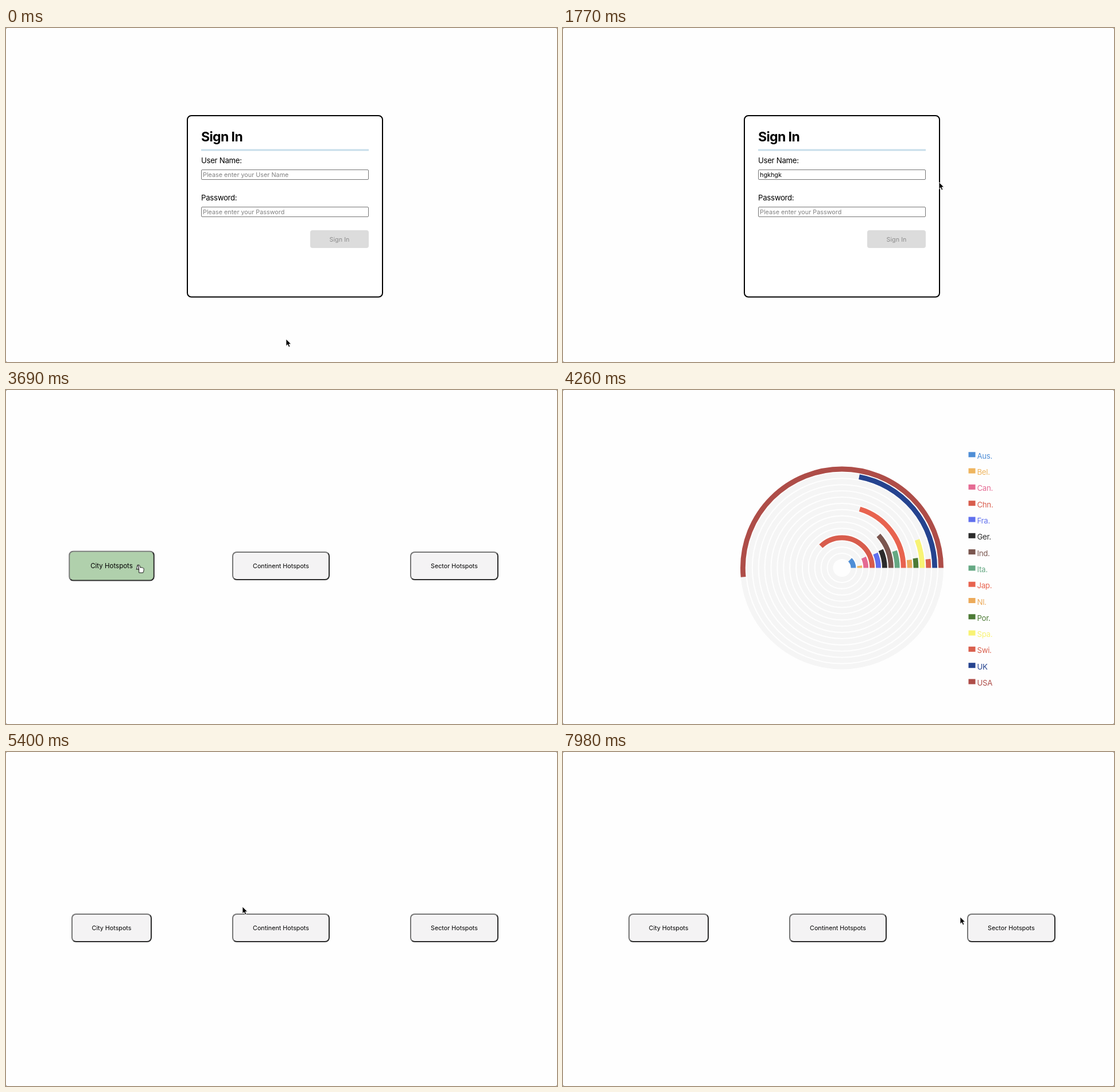
These frames come from a looping animation (960 px wide and 583 px high, 8 s). An HTML page:

```html
<!DOCTYPE html>
<html lang="en">
<head>
<meta charset="utf-8">
<title>Hotspots</title>
<style>
  html, body { margin: 0; width: 100%; height: 100%; overflow: hidden; background: #fefefe; }
  body { font: 13.2px Inter, Roboto, sans-serif; letter-spacing: -.28px; }
  svg, #menu { position: absolute; left: 0; top: 0; width: 960px; height: 583px; }
  .small { font-size: 10.8px; letter-spacing: 0; }
  .hint { fill: #808080; }
  .field { fill: #fff; stroke: #767676; }
  .title { font-size: 23px; font-weight: 700; letter-spacing: -.6px; }
  .key { visibility: hidden; animation: key 8s step-end infinite; }
  @keyframes key { 0% { visibility: visible } 40%, 100% { visibility: hidden } }

  .button {
    position: absolute; top: 282px; height: 50px; box-sizing: border-box;
    display: flex; align-items: center; justify-content: center;
    border: 2px solid; border-color: #777 #2b2b2b #2b2b2b #777; border-radius: 8px;
    background: #f4f3f4; font-size: 10.75px; letter-spacing: 0; white-space: nowrap;
  }

  .ring { fill: none; stroke: #f5f5f5; stroke-width: 8.8; }
  .bar {
    fill: none; stroke-width: 8.8; stroke-dasharray: var(--sweep) 360;
    animation: sweep 8s linear infinite;
  }
  .grid { fill: none; stroke: #dcdcdc; }
  .tick { fill: #ccc; }
  .area {
    fill: #8884d8; fill-opacity: .3; stroke: #a9a5d0; vector-effect: non-scaling-stroke;
    animation: spread 8s linear infinite;
  }
  #pointer { animation: travel 8s ease-in-out infinite; }
</style>
</head>
<body>
<svg id="stage" viewBox="0 0 960 583">
  <g id="login">
    <rect x="316" y="153" width="340" height="316.5" rx="7" fill="#fff" stroke="#000" stroke-width="2"/>
    <text class="title" x="340" y="198">Sign In</text>
    <rect x="340" y="211.5" width="292" height="3" fill="#c7deea"/>
    <text x="340" y="235.5">User Name:</text>
    <rect class="field" x="340.5" y="247.5" width="291" height="17" rx="1.5"/>
    <text class="small hint" id="nameHint" x="343" y="260">Please enter your User Name</text>
    <text class="small" id="name" x="343" y="260"></text>
    <text x="340" y="300.5">Password:</text>
    <rect class="field" x="340.5" y="312.5" width="291" height="17" rx="1.5"/>
    <text class="small hint" id="passHint" x="343" y="325">Please enter your Password</text>
    <text class="small" id="pass" x="343" y="325"></text>
    <rect x="530" y="353" width="102" height="31" rx="4" fill="#dcdcdc"/>
    <text class="small" x="581" y="372.5" text-anchor="middle" fill="#8c8c8c">Sign In</text>
    <g id="enabled">
      <rect x="530" y="353" width="102" height="31" rx="4" fill="#c7deea"/>
      <text class="small" x="581" y="372.5" text-anchor="middle">Sign In</text>
    </g>
  </g>
  <g id="radial"></g>
  <g id="radar"></g>
  <path d="M0 0h2L0 2zM960 0h-2l2 2zM0 583h2l-2-2zM960 583h-2l2-2z" fill="#aaa"/>
</svg>

<div id="menu">
  <div class="button" id="city" style="left:114px;width:140px">City Hotspots</div>
  <div class="button" id="continent" style="left:394px;width:170px">Continent Hotspots</div>
  <div class="button" style="left:704px;width:154px">Sector Hotspots</div>
</div>

<svg viewBox="0 0 960 583">
  <g id="pointer">
    <path id="arrow" d="M0 0V12.2L2.8 9.6 4.7 14 6.9 13 5 8.8H8.8Z" stroke="#fff" stroke-width=".8"/>
    <path id="beam" d="M-2.5-6.5Q0-6.5 0-5V5Q0 6.5-2.5 6.5M2.5-6.5Q0-6.5 0-5M0 5Q0 6.5 2.5 6.5" fill="none" stroke="#222"/>
    <path id="hand" d="M-2 1Q-1-.8.4 1L1.8 5.2Q3.2 3.8 4.2 5.2 5.6 4.2 6.4 5.8 8 5.6 8 7.5 8.2 11 6.5 14H-.5Q-2-11-4.8 8.6-4.6 6.6-2.6 7.8L-.8 9Z" fill="#fff" stroke="#111"/>
  </g>
</svg>

<script>
const LOOP = 8000, CX = 486, CY = 310.5;
const MENU_1 = 2490, RADIAL = 3780, MENU_2 = 5040, RADAR = 6366, MENU_3 = 7500, GROW = 1200;
const $ = id => document.getElementById(id);
const sheet = document.head.appendChild(document.createElement('style'));

// steps: [milliseconds, declarations]
const keyframes = (name, steps) => {
  const body = steps.map(([ms, css]) => `${ms / LOOP * 100}%{${css}}`).join('');
  sheet.append(`@keyframes ${name}{${body}}\n`);
};

// Switches an element between two styles during the given spans.
const during = (id, spans, on = 'opacity:1', off = 'opacity:0') => {
  const steps = spans.flatMap(([from, to]) => [[from, on], [to, off]]);
  if (spans[0][0] > 0) steps.unshift([0, off]);
  keyframes(id + 'State', steps);
  $(id).style.animation = `${id}State 8s step-end infinite`;
};

const type = (id, letters, start, gap) => {
  $(id).innerHTML = [...letters].map((c, i) =>
    `<tspan class="key" style="animation-delay:${start + i * gap}ms">${c}</tspan>`).join('');
};

const at = (r, degrees) => {
  const a = degrees * Math.PI / 180;
  return [CX + r * Math.sin(a), CY - r * Math.cos(a)];
};

// Sign-in form
type('name', 'hgkhgk', 870, 80);
type('pass', '••••••••', 1920, 30);
during('nameHint', [[0, 870]]);
during('passHint', [[0, 1920]]);
during('enabled', [[1920, LOOP]]);

// Scenes
during('login', [[0, MENU_1]]);
during('menu', [[MENU_1, RADIAL], [MENU_2, RADAR], [MENU_3, LOOP]]);
during('radial', [[RADIAL, MENU_2]]);
during('radar', [[RADAR, MENU_3]]);

const hover = ['transform:scale(1.07);background:#b0d0ac', 'transform:none;background:#f4f3f4'];
during('city', [[3272, RADIAL]], ...hover);
during('continent', [[2807, 3073], [5530, RADAR]], ...hover);

// Radial bars: label, colour, sweep in degrees
const countries = [
  ['Aus.', '#4f8ed6', 66], ['Bel.', '#efb55f', 10], ['Can.', '#e56a93', 37],
  ['Chn.', '#d85c4c', 196], ['Fra.', '#6070ee', 34], ['Ger.', '#2b2b2b', 36],
  ['Ind.', '#7a564f', 61], ['Ita.', '#65a883', 26], ['Jap.', '#e8634f', 107],
  ['Nl.', '#ecaa5a', 10], ['Por.', '#4c7a35', 11], ['Spa.', '#f8f374', 30],
  ['Swi.', '#d95f4d', 8.5], ['UK', '#25438f', 116], ['USA', '#ae4d48', 271]
];
$('radial').innerHTML = countries.map(([label, color, sweep], i) => {
  const r = 20 + i * 10.9, y = 108.3 + i * 28.3;
  const circle = `M${CX + r} ${CY}a${r} ${r} 0 0 0 ${-2 * r} 0a${r} ${r} 0 0 0 ${2 * r} 0`;
  return `<path class="ring" d="${circle}"/>
    <path class="bar" d="${circle}" pathLength="360" stroke="${color}" style="--sweep:${sweep}"/>
    <rect x="706.5" y="${y}" width="12" height="9" fill="${color}"/>
    <text x="721.5" y="${y + 11.5}" fill="${color}">${label}</text>`;
}).join('');

// Radar: label, final radius
const regions = [
  ['Africa', 52], ['Asia', 117], ['Emerg. Markets', 45], ['Europe', 199], ['Lat. America', 36],
  ['Middle East', 30], ['N. America', 31], ['Oceania', 34], ['Rest Of World', 23.4]
];
const rings = [0, 80, 160, 240, 320].map(value => [value, 23.4 + value * .584]);
const spokes = regions.map(([label], i) => {
  const [x1, y1] = at(23.4, i * 40), [x2, y2] = at(210.3, i * 40), [x, y] = at(217, i * 40);
  const anchor = i === 0 ? 'middle' : i < 5 ? 'start' : 'end';
  return `<path class="grid" d="M${x1} ${y1}L${x2} ${y2}"/>
    <text x="${x}" y="${y}" text-anchor="${anchor}">${label}</text>`;
});
const circles = rings.map(([value, r]) => {
  const [x, y] = at(r, 40);
  return `<circle class="grid" cx="${CX}" cy="${CY}" r="${r}"/>
    <text class="tick" transform="translate(${x} ${y}) rotate(40)">${value}</text>`;
});
const outline = regions.map(([, r], i) => {
  const [x, y] = at(r, i * 40);
  return `${x - CX},${y - CY}`;
}).join(' ');
$('radar').innerHTML = circles.join('') + spokes.join('') +
  `<g transform="translate(${CX} ${CY})"><polygon class="area" points="${outline}"/></g>
   <rect x="456" y="563" width="12" height="9" fill="#9d9ed8"/>
   <text x="471" y="574.5" fill="#a3a0bd">Count</text>`;

const grow = (name, start, from, to) => keyframes(name, [
  [0, from], [start, from + ';animation-timing-function:ease'], [start + GROW, to], [LOOP, to]
]);
grow('sweep', RADIAL, 'stroke-dashoffset:var(--sweep)', 'stroke-dashoffset:0');
grow('spread', RADAR, 'transform:scale(0)', 'transform:scale(1)');

// Pointer
const beam = [[525, 1580], [1870, 2215]];
const hand = [[2280, MENU_1], [2807, 3073], [3272, RADIAL], [5530, RADAR]];
during('beam', beam);
during('hand', hand);
during('arrow', [...beam, ...hand], 'opacity:0', 'opacity:1');
keyframes('travel', [
  [0, 488, 543], [90, 488, 543], [540, 500, 257], [1380, 500, 257], [1620, 658, 262],
  [1680, 667, 265], [1770, 655, 269], [1890, 560, 321], [2190, 560, 321], [2340, 575, 370],
  [MENU_1, 570, 372], [3060, 397, 300], [3300, 235, 305], [RADIAL, 232, 305], [4020, -20, -20],
  [5050, -20, -20], [5370, 412, 270], [5490, 412, 270], [5640, 430, 300], [RADAR, 440, 306],
  [6500, -20, -20], [7520, -20, -20], [7970, 692, 288], [LOOP, 692, 288]
].map(([ms, x, y]) => [ms, `transform:translate(${x}px,${y}px)`]));
</script>
</body>
</html>
```
